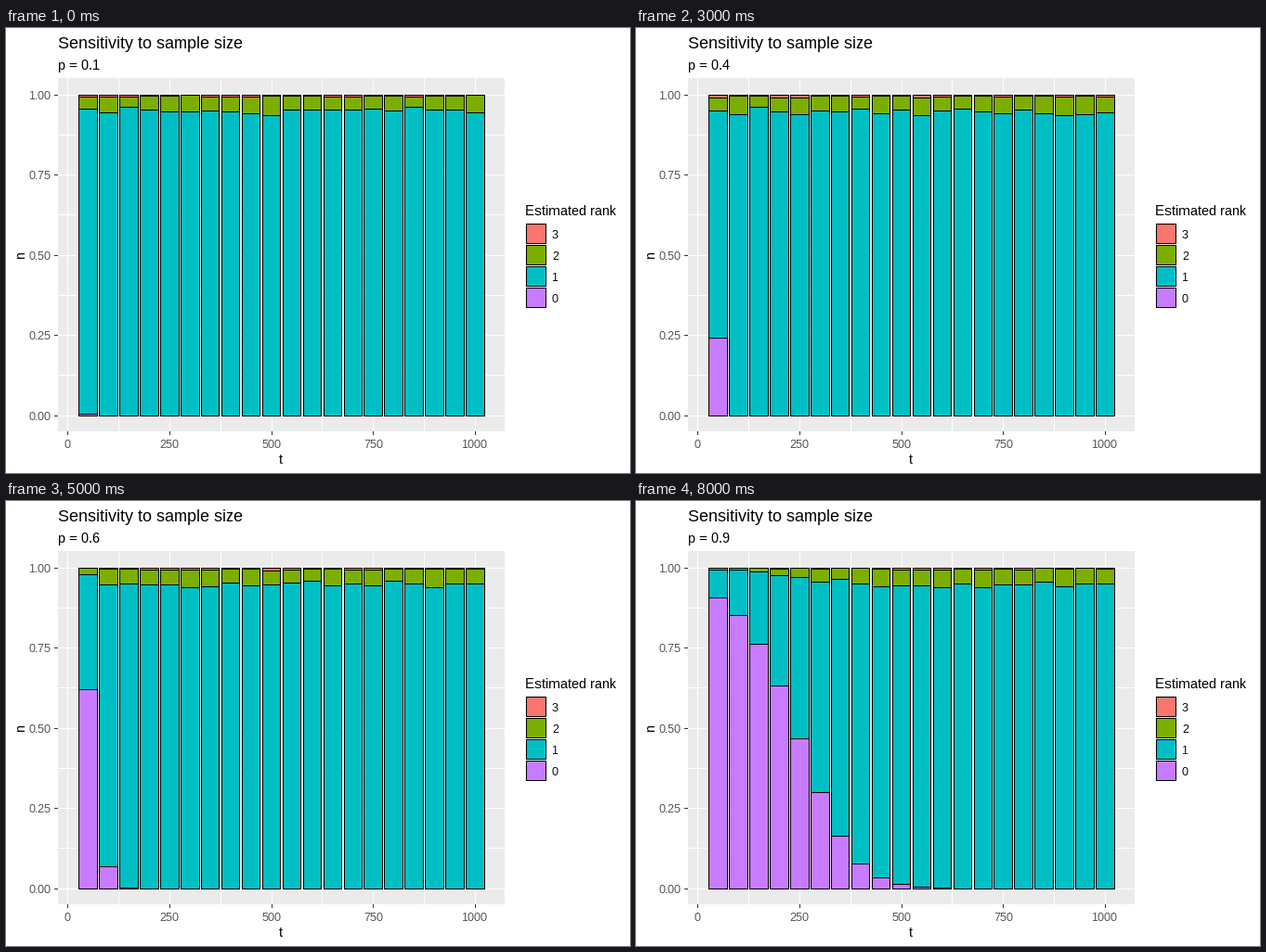
A matplotlib script that plays this animation: 672x480 px, repeating every 9000 ms.

```python
import numpy as np
import matplotlib.pyplot as plt
from matplotlib.animation import FuncAnimation
from matplotlib.patches import Rectangle

plt.rcParams.update({
    "font.family": "Liberation Sans",
    "text.hinting": "native",
    "text.hinting_factor": 1,
    "toolbar": "None",
})

W, H, DPI = 672, 480, 96
COLORS = ("#F8766D", "#7CAE00", "#00BFC4", "#C77CFF")  # rank 3, 2, 1, 0
LEFT, TOP, RIGHT, BOTTOM = 56, 54, 537, 435
ONE, ZERO = 72, 418  # pixel rows of n = 1 and n = 0
SIZES = np.arange(50, 1001, 50)
TRIALS = 1000


def px(t):
    return 65.8 + 0.43943 * t


def py(n):
    return ZERO - (ZERO - ONE) * n


def shares(p):
    """Simulated cumulative shares of rank 0, up to 1 and up to 2 per size."""
    rng = np.random.default_rng(round(10 * p))
    # Rank 0 depends on the effective size t * (1 - p), a bit more for small p
    x = SIZES * (1 - p) * (1 + 0.3 * (1 - p) ** 3)
    rank0 = 1 / (1 + np.exp(-(2.75 - 0.09 * x - 0.001 * x ** 2)))
    found = np.rint(TRIALS * (1 - rank0)).astype(int)
    above1 = rng.binomial(found, 0.051)
    above2 = rng.binomial(above1, 0.08)
    return rank0, 1 - above1 / TRIALS, 1 - above2 / TRIALS


fig = plt.figure(figsize=(W / DPI, H / DPI), dpi=DPI, facecolor="white")
ax = fig.add_axes([0, 0, 1, 1])
ax.set_xlim(0, W)
ax.set_ylim(H, 0)
ax.axis("off")


def box(x0, y0, x1, y1, color):
    """Fill the pixels from x0, y0 up to but without x1, y1."""
    return ax.add_patch(Rectangle((x0, y0), x1 - x0, y1 - y0, facecolor=color,
                                  linewidth=0, antialiased=False))


def cell(x0, y0, x1, y1, color):
    """Outlined box whose outline lies on the given pixels."""
    parts = [box(x0, y0, x1 + 1, y1 + 1, "black")]
    if y1 - y0 > 1:
        parts.append(box(x0 + 1, y0 + 1, x1, y1, color))
    return parts


def label(x, y, s, size, color="black", ha="left", **kw):
    return ax.text(x, y, s, fontsize=size * 72 / DPI, color=color, ha=ha,
                   va="baseline", **kw)


# Panel, grid and axes
box(LEFT, TOP, RIGHT, BOTTOM, "#EBEBEB")
for i in range(9):
    x, y = round(px(125 * i)), int(py(i / 8))
    box(LEFT, y, RIGHT, y + 1, "white")
    box(x, TOP, x + 1, BOTTOM, "white")
    if i % 2 == 0:
        box(LEFT - 4, y, LEFT, y + 1, "#333333")
        box(x, BOTTOM, x + 1, BOTTOM + 4, "#333333")
        label(49, y + 5, f"{i / 8:.2f}", 12, "#4D4D4D", "right")
        label(px(125 * i), 453, f"{125 * i}", 12, "#4D4D4D", "center")
label(296, 470, "t", 15, ha="center")
label(20, 245, "n", 15, ha="center", rotation=90, rotation_mode="anchor")

label(56, 22, "Sensitivity to sample size", 18)
subtitle = label(56, 45, "", 15)

# Legend
label(559, 202, "Estimated rank", 15)
box(559, 210, 582, 302, "#F2F2F2")
for i, color in enumerate(COLORS):
    y = 211 + 23 * i
    cell(560, y, 581, y + 21, color)
    label(588, y + 16, str(3 - i), 12)

bars = []


def draw(i):
    while bars:
        bars.pop().remove()
    p = (i + 1) / 10
    subtitle.set_text(f"p = {p:.1f}")
    for t, rank0, upto1, upto2 in zip(SIZES, *shares(p)):
        x0, x1 = round(px(t - 22.5)), round(px(t + 22.5))
        rows = [int(round(py(n))) for n in (1, upto2, upto1, rank0, 0)]
        for y0, y1, color in zip(rows, rows[1:], COLORS):
            bars.extend(cell(x0, y0, x1, y1, color))
    return bars + [subtitle]


anim = FuncAnimation(fig, draw, frames=9, interval=1000, repeat=True,
                     repeat_delay=0, init_func=lambda: draw(0), blit=False)
plt.show()
```
